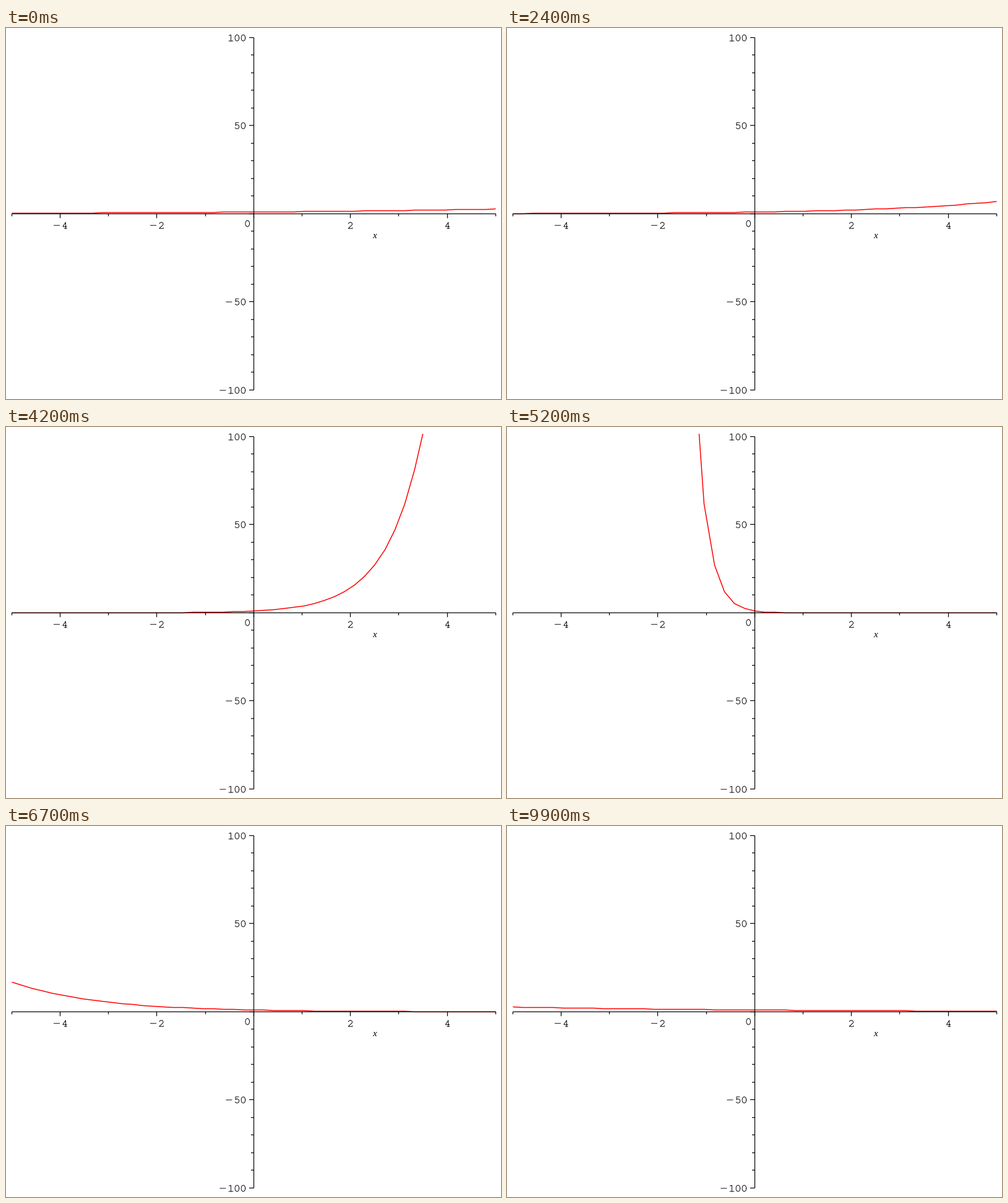
A matplotlib script for the animation above (10 s loop, 800 by 600 pixels).

```python
import numpy as np
import matplotlib.pyplot as plt
from matplotlib.animation import FuncAnimation
from matplotlib.patches import Rectangle

W, H, DPI = 800, 600, 100
FRAMES, INTERVAL = 100, 100
PX = 72 / DPI                  # one pixel in points
CX, CY = 400.3, 300.48         # plot origin in pixels
SX, SY = 78.2, 2.85            # pixels per unit
TOP = 11                       # the curve is cut off above this row

fig = plt.figure(figsize=(W / DPI, H / DPI), dpi=DPI, facecolor="white")
ax = fig.add_axes([0, 0, 1, 1])
ax.set_xlim(0, W)
ax.set_ylim(H, 0)
ax.axis("off")


def to_pixels(x, y):
    """Map plot units to the centre of the pixel they fall in."""
    return np.floor(CX + SX * x) + 0.5, np.floor(CY - SY * y) + 0.5


def rule(x0, y0, x1, y1):
    ax.plot([x0, x1], [y0, y1], color="black", lw=1.3 * PX, alpha=0.95,
            snap=False, solid_capstyle="butt", zorder=3)


def arc(cx, cy, rx, ry, start, end):
    t = np.radians(np.linspace(start, end, 30))
    return list(zip(cx + rx * np.cos(t), cy + ry * np.sin(t)))


# Thin typewriter digits as pen strokes around the glyph centre, y upwards.
GLYPHS = {
    "0": [arc(0, 0, 3.3, 5, 0, 360)],
    "1": [[(-2.8, 3.9), (0.1, 5), (0.1, -5)], [(-3.2, -5), (3.4, -5)]],
    "2": [arc(0, 2.1, 3, 2.9, 165, -32) + [(-3.4, -5), (3.4, -5), (3.4, -4)]],
    "4": [[(3.2, -2), (-3.2, -2), (1.4, 5), (1.4, -5)], [(-0.6, -5), (3.2, -5)]],
    "5": [[(2.6, 5), (-2.4, 5), (-2.4, 0.6)] + arc(0, -1.7, 3.3, 3.3, 135, -150)],
    "-": [[(-4.5, 0), (4.5, 0)]],
}


def label(value, x, y):
    """Write an integer whose last digit is centred on (x, y)."""
    for i, ch in enumerate(reversed(str(value))):
        gx = x - 10 * i - (3 if ch == "-" else 0)
        for stroke in GLYPHS[ch]:
            sx, sy = np.array(stroke).T
            ax.plot(gx + sx, y - sy, color="black", lw=0.95 * PX, zorder=4,
                    snap=False, solid_capstyle="projecting",
                    solid_joinstyle="miter")


# Axes and ticks
left, top = to_pixels(-5, 100)
right, bottom = to_pixels(5, -100)
x0, y0 = to_pixels(0, 0)
rule(left, y0, right, y0)
rule(x0, top, x0, bottom)
for v in range(-5, 6):
    px, _ = to_pixels(v, 0)
    major = v % 2 == 0
    rule(px, y0, px, y0 + (7 if major else 4))
    if major and v:
        label(v, px + (7.5 if v < 0 else 0), 319.2)
for v in range(-100, 101, 10):
    _, py = to_pixels(0, v)
    major = v % 50 == 0
    rule(x0 - (7.5 if major else 4.5), py, x0, py)
    if major and v:
        label(v, 383.4, py + 0.5)
label(0, 390.2, 316.3)
ax.text(595.6, 340.5, "x", family="Liberation Serif", style="italic",
        size=15 * PX, ha="center", va="baseline", zorder=4)

# Curve y = exp(x / a), with a running from 5 to -5
xs = np.linspace(-5, 5, 49)
curve, = ax.plot([], [], color="red", lw=1.5 * PX, zorder=2, snap=False,
                 solid_capstyle="butt", solid_joinstyle="miter")
curve.set_clip_path(Rectangle((0, TOP), W, H - TOP, transform=ax.transData))


def update(i):
    a = 5 - 10 * i / (FRAMES - 1)
    curve.set_data(*to_pixels(xs, np.minimum(np.exp(xs / a), 1e6)))
    return curve,


anim = FuncAnimation(fig, update, frames=FRAMES, interval=INTERVAL,
                     repeat=True, repeat_delay=0)
plt.show()
```
